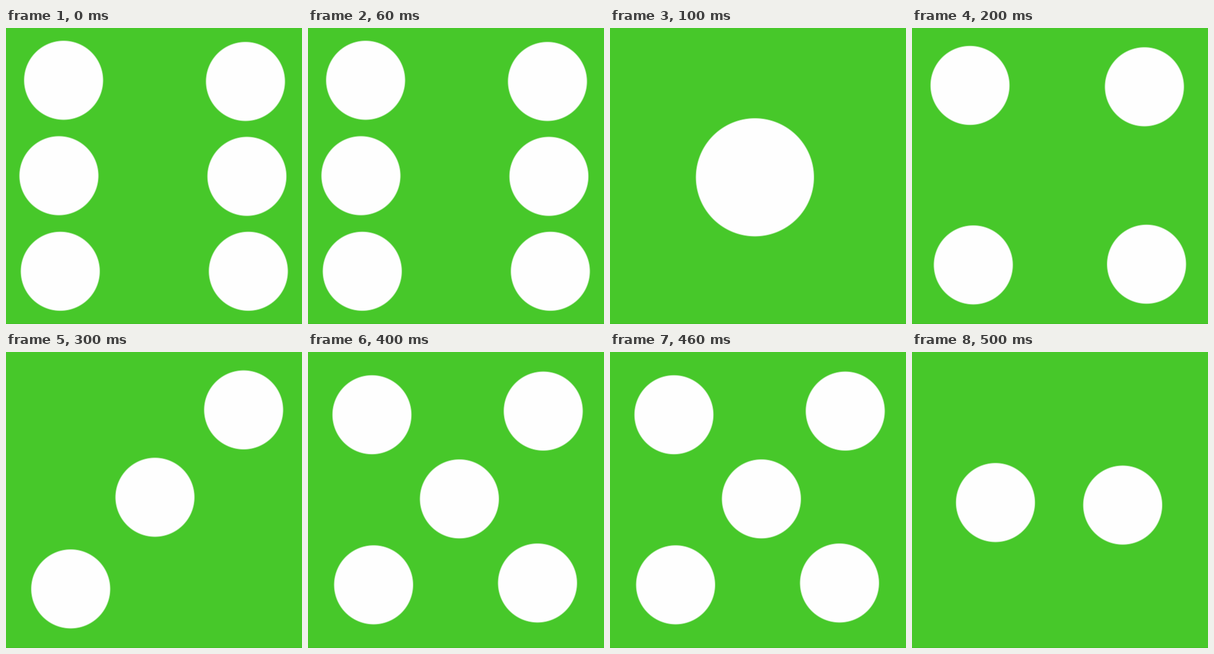
These frames come from a looping animation (500 px wide and 500 px high, 600 ms). An HTML page with a canvas:

```html
<!DOCTYPE html>
<html lang="en">
<head>
<meta charset="utf-8">
<title>Rolling die</title>
<style>
  html, body { margin: 0; width: 100%; height: 100%; overflow: hidden; background: #47c82a; }
  canvas { display: block; width: 100vw; height: 100vh; }
</style>
</head>
<body>
<canvas id="die" width="500" height="500"></canvas>
<script>
const ctx = document.getElementById('die').getContext('2d');
const STEP = 100, PIP = 66.7, BIG_PIP = 99.7;

function pip(x, y, r = PIP) {
  const soft = ctx.createRadialGradient(x, y, r - 1, x, y, r + 1);
  soft.addColorStop(0, '#fefefe');
  soft.addColorStop(1, '#fefefe00');
  ctx.fillStyle = soft;
  ctx.beginPath();
  ctx.arc(x, y, r + 1, 0, Math.PI * 2);
  ctx.fill();
}

function pair(x1, y1, x2, y2) {
  pip(x1, y1);
  pip(x2, y2);
}

// A pair with a third pip halfway, pushed sideways by bow
function trio(x1, y1, x2, y2, bow) {
  const dx = x2 - x1, dy = y2 - y1, k = bow / Math.hypot(dx, dy);
  pair(x1, y1, x2, y2);
  pip((x1 + x2) / 2 + dy * k, (y1 + y2) / 2 - dx * k);
}

const faces = [
  () => { trio(97.3, 88.3, 91.7, 410.9, -5.1); trio(404.5, 90.3, 409.4, 410.9, 0); },
  () => pip(244.8, 252.2, BIG_PIP),
  () => { pair(98, 97, 392.6, 99.3); pair(103.6, 400.2, 396.2, 399); },
  () => trio(109.3, 400.2, 401.4, 97.8, 5.2),
  () => { trio(110.8, 393.3, 397.4, 99.8, -2.3); pair(108, 106, 387.7, 390.2); },
  () => pair(141, 254.3, 355.9, 258.6)
];

const start = performance.now();
function tick() {
  const t = performance.now() - start;
  ctx.fillStyle = '#47c82a';
  ctx.fillRect(0, 0, 500, 500);
  ctx.fillStyle = '#43bc28';
  ctx.fillRect(0, 499, 500, 1);
  faces[Math.floor(t / STEP) % faces.length]();
  requestAnimationFrame(tick);
}
tick();
</script>
</body>
</html>
```
